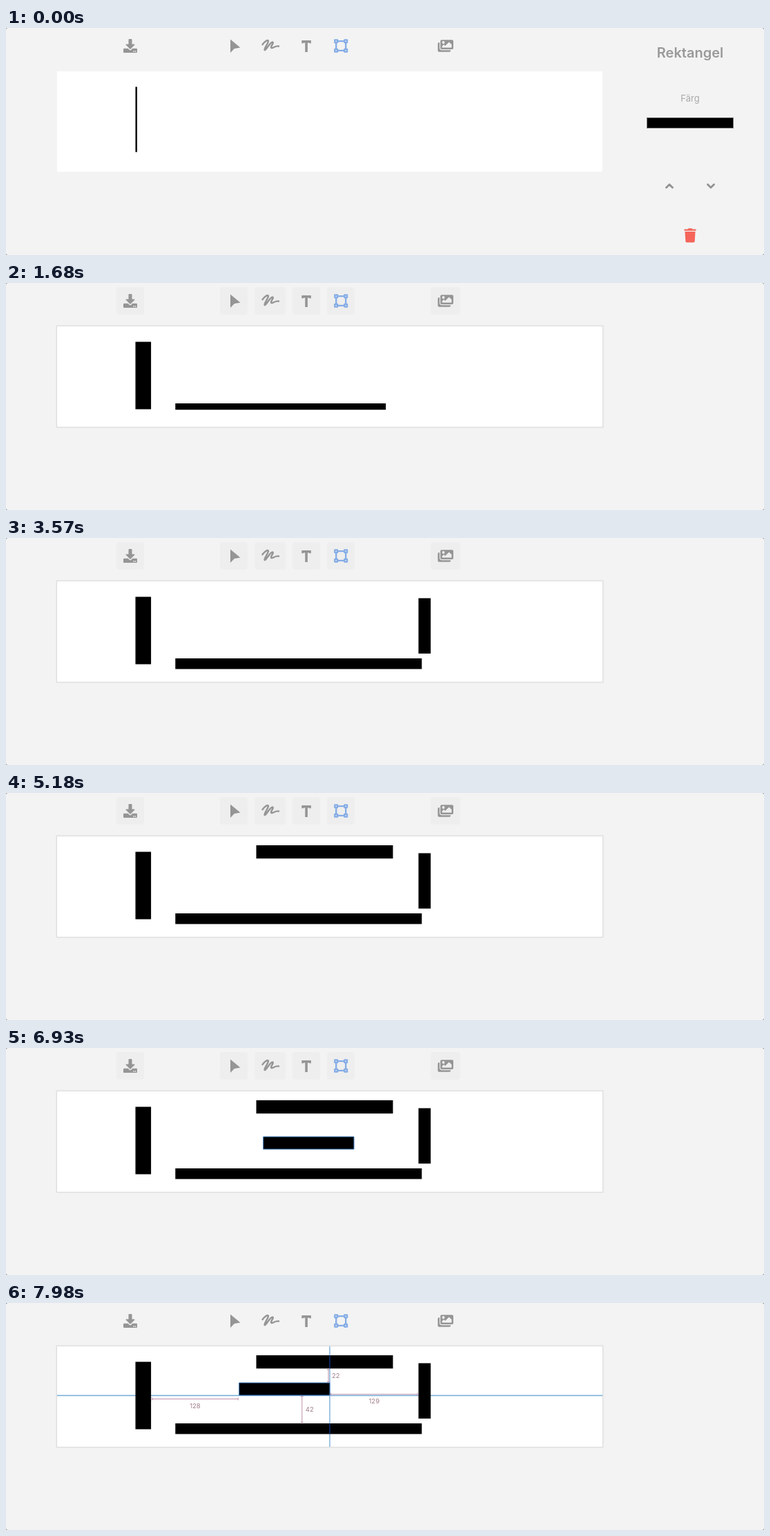
Animation of 1098 by 330 pixels, one loop 8000 ms. Source, as an HTML page:

```html
<!DOCTYPE html>
<html lang="sv">
<head>
<meta charset="utf-8">
<style>
html, body { margin: 0; width: 1098px; height: 330px; overflow: hidden; background: #888 }
svg { display: block }
text { font-family: Inter, "Liberation Sans", sans-serif; text-anchor: middle }
#gaps text { font-size: 9.5px; fill: #a07f8c }
#gaps path { stroke: #bd8faa; fill: none }
.guide { stroke: #70abd8; stroke-width: 1.3 }
#glow { stroke: #0c2058; stroke-width: 2; mix-blend-mode: lighten }
.line { fill: none; stroke-linecap: round; stroke-linejoin: round }
</style>
</head>
<body>
<svg width="1098" height="330" viewBox="0 0 1098 330">
  <defs>
    <rect id="button" y="6" width="40" height="40" rx="4"/>
    <rect id="handle" x="-1.9" y="-1.9" width="3.8" height="3.8"/>
  </defs>
  <rect width="1098" height="330" rx="3" fill="#f3f3f3"/>
  <g id="buttons" fill="#eee">
    <use href="#button" x="160"/>
    <use href="#button" x="310"/>
    <rect x="360" y="6" width="45" height="40" rx="4"/>
    <use href="#button" x="415"/>
    <use href="#button" x="465"/>
    <rect x="615" y="6" width="43" height="40" rx="4"/>
  </g>

  <g fill="#959595">
    <path d="M178.4 16h3.2q.9 0 .9.9v6.6h3.5q1 .3.4 1.1l-5.9 6q-.5.4-1 0l-5.9-6q-.6-.8.4-1.1h3.5v-6.6q0-.9.9-.9z
      M171 29.7h5.7l2 2q1.3 1.1 2.6 0l2-2h5.7q1 0 1 1v4.3q0 1-1 1h-18q-1 0-1-1v-4.3q0-1 1-1z"/>
    <path d="M184.3 34h1.5m1 0h1.5" stroke="#f3f3f3" stroke-width="1.5"/>
    <path d="M325 16.5L339.4 28.6 330.8 30 325 36z"/>
    <path class="line" stroke="#959595" stroke-width="2.4" d="M371.5 24C374 20.5 379.5 16 380 19C380 22 373 31 374.5 32C376 33.5 383 20 386 20.5C389 21 382 28 384.5 29C387 29.500 390 25.500 395 26.500"/>
    <path d="M428.3 18h13.6v4.3h-2.2l-.6-.9h-2.2V35h-3.6V21.4h-2.2l-.6.9h-2.2z"/>
    <path fill-rule="evenodd" d="M631.1 17.2h15q1.900 0 1.900 1.900v10q0 1.900-1.900 1.900h-15q-1.900 0-1.900-1.900v-10q0-1.900 1.900-1.900z
      M631.7 21a1.900 1.900 0 0 0 3.800 0a1.900 1.900 0 0 0-3.800 0z
      M631.7 26.600l2.500-2.500 1.900 1.900 5.600-5.600 3.800 3.700v4.400h-13.800z"/>
    <path d="M644.2 32.200v.6q0 1.900-1.900 1.900h-14.900q-1.900 0-1.900-1.900v-9.900q0-1.900 1.900-1.900h.6v8.100q0 3.100 3.100 3.100z"/>
  </g>
  <g class="line" stroke="#84ace6" stroke-width="2.3">
    <use href="#handle" x="478.2" y="19.2"/>
    <use href="#handle" x="492.2" y="19.2"/>
    <use href="#handle" x="478.2" y="32.800"/>
    <use href="#handle" x="492.2" y="32.800"/>
    <path d="M481 19.200h8.500M481 32.800h8.500M478.200 22v8M492.200 22v8"/>
  </g>

  <g id="frame">
    <rect x="71.5" y="60.5" width="795" height="151" rx="2" fill="#eee"/>
    <rect x="73" y="62" width="792" height="148" fill="#dcdcdc"/>
  </g>
  <rect x="74" y="63" width="790" height="146" fill="#fff"/>

  <path id="across" class="guide"/>
  <path id="down" class="guide"/>
  <g id="bars"></g>
  <path id="glow"/>
  <g id="gaps"></g>

  <g id="panel" fill="#999">
    <text x="991" y="43" font-size="20" font-weight="600">Rektangel</text>
    <text x="991" y="107" font-size="13" fill="#a9a9a9">Färg</text>
    <rect x="928.5" y="130.5" width="125" height="15" fill="#000" stroke="#777"/>
    <path class="line" stroke="#929292" stroke-width="2.8" d="M956.5 232l4.5-4.5 4.5 4.5M1016.5 227.5l4.5 4.5 4.5-4.5"/>
    <path fill="#f5655a" d="M982.5 292.5h5l1-1.3h5l1 1.3h5v2.2h-17zM983.5 296h15l-.8 14q-.1 1.7-1.8 1.7h-9.8q-1.7 0-1.8-1.7z"/>
  </g>
</svg>
<script>
const LOOP = 8000, STEP = 70;
const $ = id => document.getElementById(id);
const ramp = (t, from, to) => Math.min(1, Math.max(0, (t - from) / (to - from)));

// Bars in drawing order; a higher ease makes the long side settle sooner.
const bars = [
  { x: 187.5, y: 85.5, w: 22.6, h: 98, from: -17, to: 140, ease: 30 },
  { x: 245.3, y: 175, w: 357, h: 15.4, from: 1050, to: 2100, ease: 2.1 },
  { x: 597.5, y: 87.5, w: 17.7, h: 80.5, from: 3010, to: 3570, ease: 1.4 },
  { x: 362.5, y: 76, w: 198, h: 19.2, from: 4760, to: 5180, ease: 1.4 },
  { x: 372.7, y: 129, w: 131.3, h: 18.1, from: 5740, to: 6440, ease: 1.4 }
];

// The last bar is dragged in two moves with a rest between them.
function dragOffset(t) {
  const first = ramp(t, 6930, 7210), second = ramp(t, 7420, 7840);
  return [-14.5 * first - 20.5 * second, -3.5 * first - 9.5 * second];
}

function box(bar, t) {
  const { x, y, w, h, from, to, ease } = bar;
  const p = ramp(t, from, to), long = 1 - (1 - p) ** ease;
  const [dx, dy] = bar == bars[4] ? dragOffset(t) : [0, 0];
  const l = x + dx, top = y + dy;
  return { l, t: top, r: l + w * (w > h ? long : p), b: top + h * (w > h ? p : long), shown: p > 0 };
}

const midX = b => (b.l + b.r) / 2, midY = b => (b.t + b.b) / 2;
const label = (x, y, gap, anchor) =>
  `<text x="${x}" y="${y}" style="text-anchor:${anchor}">${Math.round(gap + .75)}</text>`;

function gapX(a, b, y) {
  const l = a + 1.5, r = b - 1.5;
  return `<path d="M${l} ${y}H${r}M${l} ${y - 2}v4M${r} ${y - 2}v4"/>` +
    label((a + b) / 2, y + 13, b - a, 'middle');
}
function gapY(a, b, x) {
  const t = a + 1.5, d = b - 1.5;
  return `<path d="M${x} ${t}V${d}M${x - 2} ${t}h4M${x - 2} ${d}h4"/>` +
    label(x + 5, (a + b) / 2 + 3.2, b - a, 'start');
}

function drawGuides(t, moving) {
  const centred = t >= 7210 && t <= 7420, aligned = t >= 7840;
  const snapped = centred || aligned;
  const column = snapped ? `M${aligned ? moving.r : midX(moving)} 63V209` : '';
  $('across').setAttribute('d', snapped ? 'M74 134.5H864' : '');
  $('down').setAttribute('d', column);
  $('glow').setAttribute('d', column);
}

function draw(t) {
  const boxes = bars.map(bar => box(bar, t));
  const [left, low, right, top, moving] = boxes;
  $('bars').innerHTML = boxes.filter(b => b.shown).map(b => {
    const outline = b == moving && t >= 6510 ? ' stroke="#3d78b8"' : '';
    return `<path d="M${b.l} ${b.t}H${b.r}V${b.b}H${b.l}z"${outline}/>`;
  }).join('');

  drawGuides(t, moving);
  $('gaps').innerHTML = t < 7000 ? '' :
    gapX(left.r, moving.l, midY(left) + 5) +
    gapX(moving.r, right.l, midY(right) + 5) +
    gapY(top.b, moving.t, midX(top) + 5.5) +
    gapY(moving.b, low.t, midX(low) + 5);

  const shown = ramp(t, 280, 630);
  $('panel').style.opacity = 1 - shown;
  $('frame').style.opacity = shown;
  $('buttons').style.opacity = t < 7490 ? shown : 0;
}

function tick() {
  const t = performance.now() % LOOP;
  draw(Math.floor(t / STEP) * STEP);
  requestAnimationFrame(tick);
}
tick();
</script>
</body>
</html>
```
